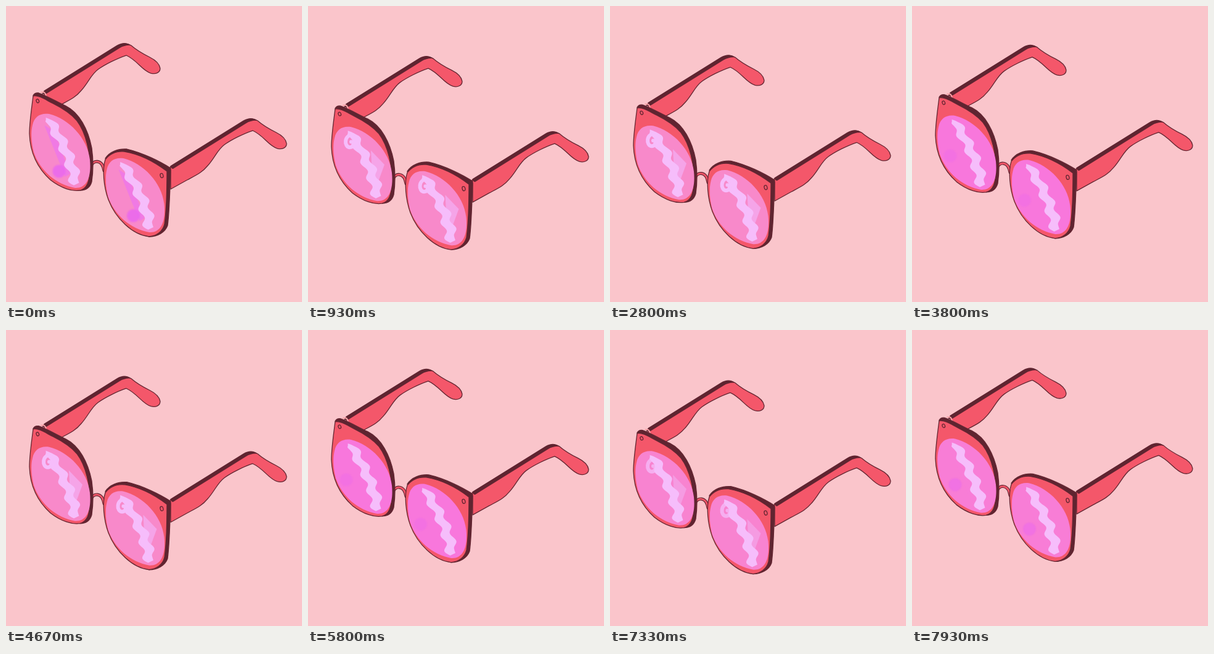
Recreate the animation shown at these times as an HTML page. Size 480x480 px, loop 8 s.

```html
<!DOCTYPE html>
<html lang="en">
<head>
<meta charset="utf-8">
<title>Sunglasses</title>
<style>
  html, body { margin: 0; width: 100%; height: 100%; overflow: hidden; background: #fac5cb; }
  svg { display: block; width: 100%; height: 100%; }
  .dark { fill: #5f2430; }
  .red { fill: #f4576a; }
  .line { stroke: #642632; stroke-width: 1.3; stroke-linejoin: round; }
  .stroke { fill: none; stroke-linecap: round; }
</style>
</head>
<body>
<svg viewBox="0 0 480 480">
  <defs>
    <clipPath id="lensClip">
      <path d="M43 193C46 179 56 173 70 175C102 183 132 214 136 249C139 279 130 296 112 295C82 290 55 267 45 237C41 221 40 205 43 193Z"/>
    </clipPath>
    <filter id="soft" x="-50%" y="-50%" width="200%" height="200%"><feGaussianBlur stdDeviation="1.2"/></filter>
    <g id="temple">
      <path class="red line" d="M62 138L180 65Q193 58 203 64C211 71 221 77 233 83C243 88 249 95 250 101C250 108 243 111 235 109C221 105 213 88 195 80C180 85 160 95 149 103C138 111 133 125 122 137C113 148 104 152 89 160L62 175Z"/>
      <path class="dark" d="M58 143L62 137L180 63.5Q193 56 203 64Q193 63 184 68.5L66 142Z"/>
    </g>
    <g id="lens" clip-path="url(#lensClip)">
      <rect id="tint" x="35" y="165" width="110" height="140"/>
      <path id="smear" fill="#ee76ec" d="M62 193L78 203L104 272L96 277Z"/>
      <circle id="blob" r="10.5" fill="#e967ef" filter="url(#soft)"/>
      <path class="facet" fill="#f5a4e8" d="M102 213L124 236L106 285Z"/>
      <path id="shine" fill="#f6bdfb"/>
      <path class="facet stroke" stroke="#f6bdfb" stroke-width="6" d="M73 188C58 187 58 208 68 208C75 207 75 199 70 199"/>
    </g>
  </defs>

  <g id="glasses">
    <use href="#temple"/>
    <use href="#temple" x="205" y="122"/>
    <path class="stroke" stroke="#f7a2a8" stroke-width="2" d="M57 140Q64 138 65 146"/>
    <path class="stroke" stroke="#f4576a" stroke-width="2.5" d="M261 263Q270 261 270 270"/>

    <path class="stroke" stroke="#642632" stroke-width="5" d="M138 260C140 250 156 247 159 267"/>
    <path class="stroke" stroke="#f4576a" stroke-width="2.6" d="M138 260C140 250 156 247 159 267"/>

    <path class="dark line" d="M44 145Q47 140 53 141C67 146 82 155 97 162C119 173 133 200 139 230Q143 258 139 285Q135 299 120 299L80 250Z"/>
    <path class="red line" d="M44 146C41 170 38 190 38 207C39 236 50 262 72 282C90 296 108 301 120 299C132 296 135 284 136 268C137 238 130 206 115 186C104 173 88 164 76 158C64 152 53 144 44 146Z"/>
    <path class="dark line" d="M161 247C168 236 182 231 196 232C222 238 250 252 267 263C266 295 265 335 262 356C258 367 246 374 232 374L200 330Z"/>
    <path class="red line" d="M161 249C169 239 180 235 192 236C216 240 240 252 261 268C261 300 260 332 257 354C254 366 244 373 232 374C205 371 178 345 166 314C158 292 156 264 161 249Z"/>

    <g class="red line">
      <ellipse cx="51.3" cy="154" rx="2.2" ry="3" transform="rotate(-20 51.3 154)"/>
      <ellipse cx="252.5" cy="275" rx="2.4" ry="3.6" transform="rotate(-15 252.5 275)"/>
    </g>
    <use href="#lens"/>
    <use href="#lens" x="120.5" y="72"/>
  </g>
</svg>
<script>
const CYCLE = 2000, FPS = 15;
const $ = id => document.getElementById(id);
const glasses = $('glasses'), tint = $('tint'), smear = $('smear'), blob = $('blob');
const facets = document.querySelectorAll('.facet');

const clamp = x => Math.min(1, Math.max(0, x));
const mix = (a, b, k) => a + (b - a) * k;
const smooth = x => (x = clamp(x), x * x * (3 - 2 * x));
const cosine = x => (1 - Math.cos(Math.PI * x)) / 2;

// Reflection: a bowed ribbon that wobbles sideways and tapers at its ends.
function ribbon() {
  const left = [], right = [];
  for (let u = 0; u <= 1; u += 0.02) {
    const y = mix(183, 291, u);
    const x = mix(68, 114, u) + 7 * Math.sin(Math.PI * u) + 3.5 * Math.sin(2 * Math.PI * (y - 188) / 25);
    const half = mix(6.5, 8, u) * Math.min(1, Math.sqrt(12 * u), Math.sqrt(14 * (1 - u)));
    left.push([x - half, y + 2]);
    right.unshift([x + half, y - 2]);
  }
  return 'M' + [...left, ...right].join('L') + 'Z';
}

// Slow start on the way down, slightly quicker way up.
function bob(t) {
  const p = (t - 10 + CYCLE) % CYCLE;
  return 24 * (p < 1070 ? cosine((p / 1070) ** 1.14) : 1 - cosine((p - 1070) / 930));
}

function draw(now) {
  const frame = Math.floor(now * FPS / 1000 + 1e-6);
  const t = frame * 1000 / FPS % CYCLE;
  const s = t > 1600 ? t - CYCLE : t;
  const fade = 1 - smooth(s / 350);
  const curled = smooth((t - 150) / 400) * (1 - smooth((t - 1100) / 500));
  const magenta = smooth((t - 1000) / 700) * clamp((CYCLE - t) / 200);

  glasses.setAttribute('transform', `translate(0 ${bob(t).toFixed(2)})`);
  tint.setAttribute('fill', `rgb(248 ${mix(137, 119, magenta)} ${mix(202, 220, magenta)})`);
  facets.forEach(facet => facet.setAttribute('opacity', curled));

  blob.setAttribute('cx', 86 + s * 0.12);
  blob.setAttribute('cy', 268 + s * 0.14);
  blob.setAttribute('opacity', 0.85 * clamp((s + 330) / 330) * fade);
  smear.setAttribute('opacity', 0.75 * smooth((s + 150) / 150) * fade);
}

$('shine').setAttribute('d', ribbon());
const start = performance.now();
function tick() {
  draw(performance.now() - start);
  requestAnimationFrame(tick);
}
tick();
</script>
</body>
</html>
```
